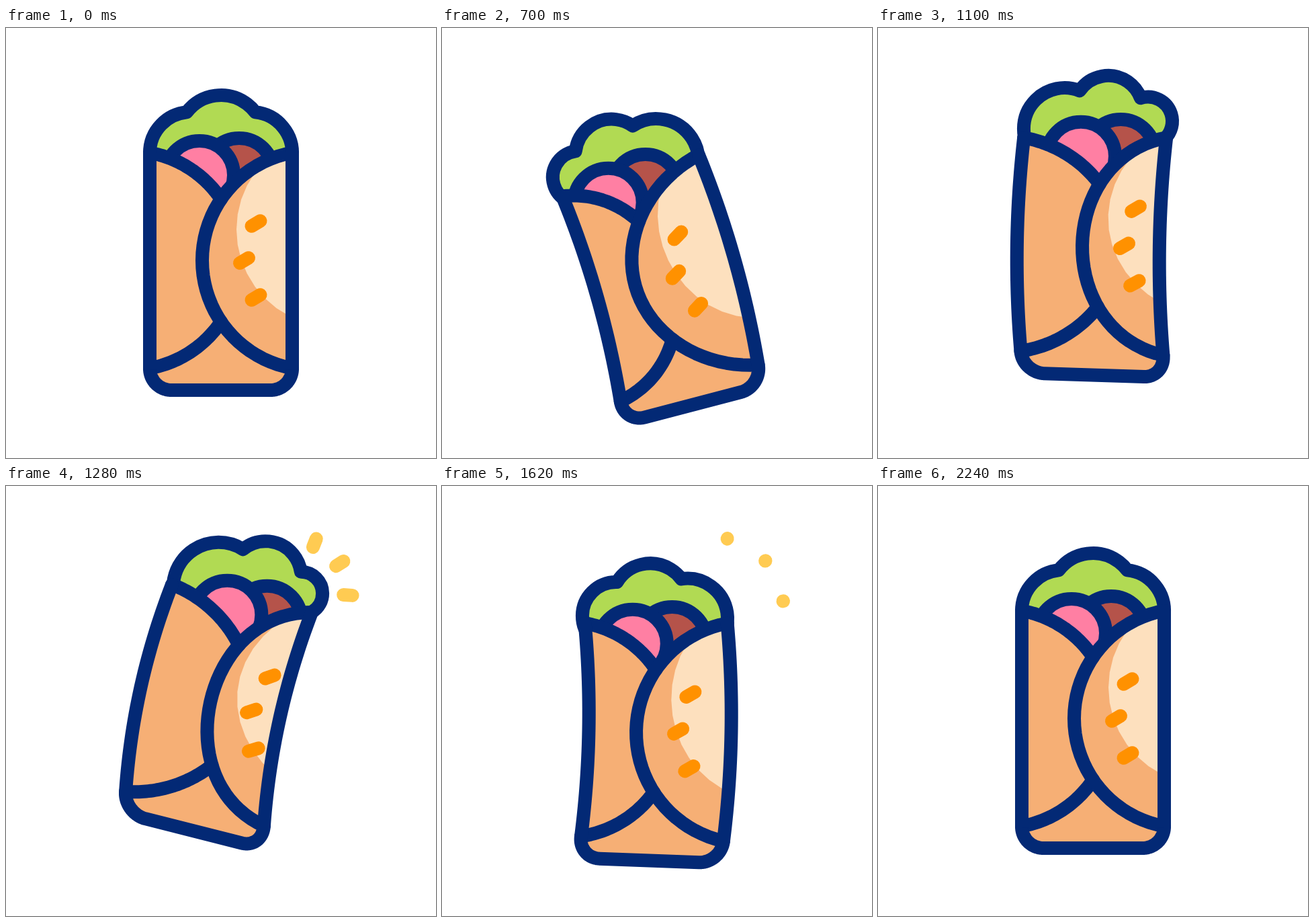
Recreate the animation shown at these times as an HTML page with a canvas. Size 640 by 640 pixels, loop 2400 ms.

```html
<!DOCTYPE html>
<html lang="en">
<head>
<meta charset="utf-8">
<title>Wrap</title>
<style>
  html, body { margin: 0; width: 100%; height: 100%; overflow: hidden; background: #fff; }
  canvas { display: block; }
</style>
</head>
<body>
<canvas id="stage" width="640" height="640"></canvas>
<script>
const ctx = document.getElementById('stage').getContext('2d');
const LOOP = 2400, STEP = 20, LINE = 20, START = 220, END = 2240;
const NAVY = '#032975', DOUGH = '#f6af75', CREAM = '#fde0be', SEED = '#ff9100';
const GREEN = '#b1da53', PINK = '#ff7fa3', BROWN = '#b5534a', SPARK = '#ffcb52';
const PI = Math.PI, DEG = PI / 180;

const span = (t, a, b) => Math.min(1, Math.max(0, (t - a) / (b - a)));
const ease = k => (1 - Math.cos(PI * k)) / 2;

// Starts and ends at rest, easing through [time, value] turning points
function swing(t, rest, ...turns) {
  let value = rest, from = START;
  for (const [time, next] of [...turns, [END, rest]]) {
    value += (next - value) * ease(span(t, from, time));
    if (t <= time) break;
    from = time;
  }
  return value;
}

// Crouch to the left, leap to the right, rock back
function poseAt(t) {
  return {
    x: swing(t, 320, [840, 325], [1450, 314], [1950, 321]),
    y: swing(t, 346, [700, 374], [1180, 320], [1740, 370]),
    tilt: DEG * swing(t, 0, [770, -16.5], [1390, 15], [1800, -8.5]),
    bend: swing(t, 0, [600, 10], [1300, -12], [1680, 10]),
    turn: swing(t, 0, [610, -0.75], [1290, 1], [1720, -0.45]),
    pop: swing(t, 0, [940, 1])
  };
}

let pose;

function rigid(u, v, angle = pose.tilt) {
  const c = Math.cos(angle), s = Math.sin(angle);
  return [pose.x + u * c - v * s, pose.y + u * s + v * c];
}

// Body space (origin at its middle) to stage
function place(u, v) {
  const k = v / 160, fan = Math.abs(pose.bend) * 1.2e-5 * u * v;
  return rigid(u + pose.bend * (1 - k * k), v + fan);
}

// Wrapper details slide sideways as the body turns
function flap(u, v) {
  const k = v / 160;
  return place(u + 28 * pose.turn * Math.max(0, 1 - k * k), v);
}

function arc(cx, cy, r, a, b, map = place) {
  const pts = [];
  for (let i = 0; i <= 40; i++) {
    const w = a + (b - a) * i / 40;
    pts.push(map(cx + r * Math.cos(w), cy + r * Math.sin(w)));
  }
  return pts;
}

function edge(u, from, to) {
  const pts = [];
  for (let i = 0; i <= 30; i++) pts.push(place(u, from + (to - from) * i / 30));
  return pts;
}

function trace(pts, close) {
  const p = new Path2D();
  pts.forEach(([x, y]) => p.lineTo(x, y));
  if (close) p.closePath();
  return p;
}

function fill(path, color) {
  ctx.fillStyle = color;
  ctx.fill(path);
}

function stroke(path, color = NAVY, width = LINE) {
  ctx.strokeStyle = color;
  ctx.lineWidth = width;
  ctx.stroke(path);
}

// Upper crossing of two circles
function cross(a, b) {
  const dx = b.x - a.x, dy = b.y - a.y, d = Math.hypot(dx, dy);
  const m = (a.r * a.r - b.r * b.r + d * d) / (2 * d);
  const h = Math.sqrt(Math.max(0, a.r * a.r - m * m));
  return [a.x + (m * dx + h * dy) / d, a.y + (m * dy - h * dx) / d];
}

// side: -1 left, 0 middle, 1 right
function lobe(side) {
  const { turn, pop } = pose, mid = side === 0;
  const [x, y] = place(
    45 * side + 21 * turn + 17 * side * pop,
    (mid ? -182 : -160) - 8 * side * turn - 20 * pop
  );
  return { x, y, r: (mid ? 64 : 61) - 18 * side * turn - 13 * pop };
}

function lettuce() {
  const [l, m, r] = [-1, 0, 1].map(lobe);
  const p = cross(l, m), q = cross(m, r);
  const angle = (c, pt) => Math.atan2(pt[1] - c.y, pt[0] - c.x);
  const path = new Path2D();
  path.arc(l.x, l.y, l.r, PI - 0.8 + pose.tilt, angle(l, p));
  path.arc(m.x, m.y, m.r, angle(m, p), angle(m, q));
  path.arc(r.x, r.y, r.r, angle(r, q), 0.8 + pose.tilt);
  fill(path, GREEN);
  stroke(path);
}

function ball(u, v, color) {
  const [x, y] = place(u + 20 * pose.turn, v - 6 * pose.pop);
  const path = new Path2D();
  path.arc(x, y, 51, 0, 2 * PI);
  fill(path, color);
  stroke(path);
}

function wrapper() {
  const R = 163, X = 135;
  const tip = Math.acos((X - 106) / R), meet = Math.acos(X / R);
  const rightArc = (a, b) => arc(X, 0, R, PI + a, PI + b, flap);
  const leftArc = (a, b) => arc(-X, 0, R, a, b, flap);
  const shell = [
    ...edge(-106, -160, 161),
    ...arc(-74, 161, 32, PI, PI / 2),
    ...arc(74, 161, 32, PI / 2, 0),
    ...edge(106, 161, -160)
  ];
  const body = trace([...shell, ...rightArc(tip, meet), ...leftArc(-meet, -tip)], true);
  const front = trace([...rightArc(tip, -tip), ...edge(106, 160, -160)], true);
  fill(body, DOUGH);

  ctx.save();
  ctx.clip(front);
  const shine = 167.5 + 15 * pose.turn - 5 * pose.pop;
  fill(trace(arc(shine, -46, 144.5, 0, 2 * PI), true), CREAM);
  for (let i = -1; i <= 1; i++) {
    const u = 34.5 + 17.5 * Math.abs(i), v = 55 * i;
    stroke(trace([flap(u - 6.5, v + 3.8), flap(u + 6.5, v - 3.8)]), SEED);
  }
  ctx.restore();

  stroke(trace(leftArc(-tip, -meet)));
  stroke(trace(leftArc(meet, tip)));
  stroke(trace(rightArc(tip, -tip)));
  stroke(trace(shell));
}

// Three dashes fan out from one point beside the lettuce
function sparks(t) {
  if (t < 1220 || t >= 1660) return;
  const out = k => Math.sin(k * PI / 2);
  const head = out(span(t, 1220, 1420)), tail = out(span(t, 1250, 1640));
  const width = LINE * span(t, 1210, 1250) * span(t, 1660, 1630);
  const frame = 0.8 * pose.tilt + 2.4 * DEG;
  for (let i = 0; i < 3; i++) {
    const a = (36 * i - 81) * DEG;
    const at = k => {
      const r = 67 + 39 * k;
      return rigid(76 + r * Math.cos(a), -187 + r * Math.sin(a), frame);
    };
    stroke(trace([at(Math.min(tail, head)), at(head + 0.01)]), SPARK, width);
  }
}

function draw(t) {
  pose = poseAt(t);
  ctx.fillStyle = '#fff';
  ctx.fillRect(0, 0, 640, 640);
  ctx.lineCap = ctx.lineJoin = 'round';
  lettuce();
  ball(27, -131, BROWN);
  ball(-32, -127, PINK);
  wrapper();
  sparks(t);
}

function tick() {
  const t = performance.now() % LOOP;
  draw(t - t % STEP);
  requestAnimationFrame(tick);
}
tick();
</script>
</body>
</html>
```
